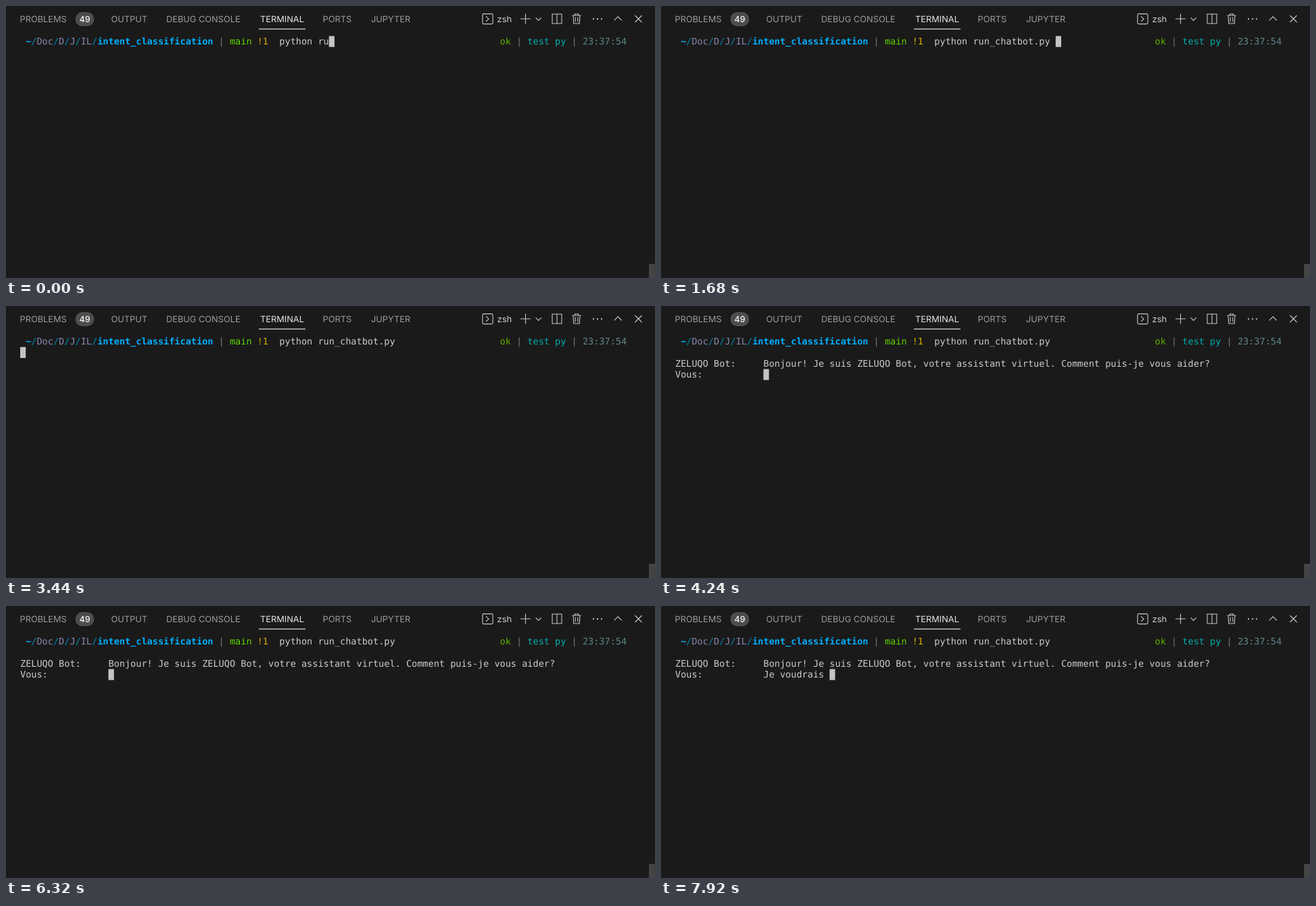
Animation, 960 px wide and 403 px high, one loop 8 s. Source, as an HTML page:

```html
<!DOCTYPE html>
<html lang="en">
<head>
<meta charset="utf-8">
<title>Terminal session</title>
<style>
  html, body { margin: 0; width: 100%; height: 100%; overflow: hidden; background: #1a1a1a; }
  svg { display: block; width: 960px; height: 403px; }
  text { white-space: pre; text-rendering: geometricPrecision; }
  .ui { font: 12.8px Inter, sans-serif; fill: #9d9d9d; }
  .ui .on { fill: #e7e7e7; }
  .ui .badge { font-size: 12.5px; font-weight: 500; fill: #f8f8f8; text-anchor: middle; }
  .ui .shell { font-size: 13px; fill: #cccccc; }
  .icons { fill: none; stroke: #c8c8c8; stroke-width: 1.1; }
  #term { font: 13.55px "DejaVu Sans Mono", monospace; fill: #cccccc; }
  #term .bold { font-weight: 700; }
</style>
</head>
<body>
<svg viewBox="0 0 960 403">
  <rect width="960" height="403" fill="#1a1a1a"/>
  <rect x="951" y="382" width="9" height="21" fill="#444"/>

  <g class="ui">
    <text x="20.5" y="24">PROBLEMS</text>
    <rect x="102.5" y="9" width="28" height="21" rx="10.5" fill="#4d4d4d"/>
    <text class="badge" x="116.5" y="23.5">49</text>
    <text x="155.5" y="24">OUTPUT</text>
    <text x="237" y="24">DEBUG CONSOLE</text>
    <text class="on" x="376" y="24">TERMINAL</text>
    <rect x="374" y="33.5" width="69" height="1.2" fill="#e7e7e7"/>
    <text x="468.5" y="24">PORTS</text>
    <text x="540" y="24">JUPYTER</text>
    <text class="shell" x="726.5" y="24">zsh</text>
  </g>

  <g class="icons">
    <rect x="704.9" y="11.6" width="15.2" height="15" rx="1.8"/>
    <path d="M710 15.2l4 4-4 4"/>
    <path d="M768.5 11.5v15M761 19h15"/>
    <path d="M783.5 17.2l4.2 4.2 4.2-4.2"/>
    <path d="M808 12h14v14h-14zM815 12v14"/>
    <path d="M837.5 14h13M841.5 14v-2.3h5V14M839 14l.8 12h8.4l.8-12M842.2 16.5v7M845.8 16.5v7"/>
    <path d="M899.7 21.4l5.5-5.5 5.5 5.5"/>
    <path d="M930.5 14l10 10M940.5 14l-10 10"/>
    <g fill="#c8c8c8" stroke="none">
      <circle cx="869" cy="19.2" r="1.1"/>
      <circle cx="875" cy="19.2" r="1.1"/>
      <circle cx="881" cy="19.2" r="1.1"/>
    </g>
  </g>

  <g id="term"></g>
</svg>

<script>
const LOOP = 8000, CELL = 8.156, LINE = 16.33, LEFT = 21, TOP = 44.5;
const term = document.getElementById('term');

function add(tag, attrs, parent = term) {
  const el = document.createElementNS('http://www.w3.org/2000/svg', tag);
  for (const key in attrs) el.setAttribute(key, attrs[key]);
  return parent.appendChild(el);
}

const colX = col => LEFT + col * CELL;

function print(row, col, str, color = '#cccccc', cls = '', parent = term) {
  const el = add('text', { x: colX(col), y: TOP + 12.9 + row * LINE, fill: color, class: cls }, parent);
  el.textContent = str;
  return el;
}

// Prompt, left and right
const SLASH = '#0087af', DIR = '#8787af', ANCHOR = '#00afff', BAR = '#767676';
print(0, 1, '~', ANCHOR, 'bold');
let col = 2;
for (const dir of ['Doc', 'D', 'J', 'IL']) {
  print(0, col, '/', SLASH);
  print(0, col + 1, dir, DIR);
  col += dir.length + 1;
}
print(0, col, '/', SLASH);
print(0, col + 1, 'intent_classification', ANCHOR, 'bold');
print(0, 36, '|', BAR);
print(0, 38, 'main', '#5fd700');
print(0, 43, '!1', '#d7af00');
print(0, 87, 'ok', '#5faf00');
print(0, 90, '|', BAR);
print(0, 92, 'test py', '#00afaf');
print(0, 100, '|', BAR);
print(0, 102, '23:37:54', '#5f8787');

const command = print(0, 47, '');

const chat = add('g', {});
print(2, 0, 'ZELUQO Bot:', undefined, '', chat);
print(2, 16, 'Bonjour! Je suis ZELUQO Bot, votre assistant virtuel. Comment puis-je vous aider?', undefined, '', chat);
print(3, 0, 'Vous:', undefined, '', chat);
const reply = print(3, 16, '', undefined, '', chat);

const cursor = add('rect', { width: 8.2, height: 16.2, fill: '#c4c4c4' });

// Times at which each text grows; the file name is tab-completed
const ENTER = 2240, GREET = 4160;
const commandSteps = [[0, 'python ru'], [160, 'python run'], [400, 'python run_'], [720, 'python run_chatbot.py ']];
const replyText = 'Je voudrais ';
const replyKeys = [6400, 6560, 6720, 7120, 7200, 7280, 7440, 7520, 7600, 7680, 7760, 7840];

function draw(t) {
  const typed = commandSteps.filter(([at]) => at <= t).pop()[1];
  const answer = replyText.slice(0, replyKeys.filter(at => at <= t).length);
  command.textContent = typed;
  reply.textContent = answer;
  chat.setAttribute('visibility', t < GREET ? 'hidden' : 'visible');

  const [row, c] = t < ENTER ? [0, 47 + typed.length]
    : t < GREET ? [1, 0]
    : [3, 16 + answer.length];
  cursor.setAttribute('x', colX(c));
  cursor.setAttribute('y', TOP + row * LINE);
}

const start = performance.now();
function tick() {
  draw((performance.now() - start) % LOOP);
  requestAnimationFrame(tick);
}
tick();
</script>
</body>
</html>
```
